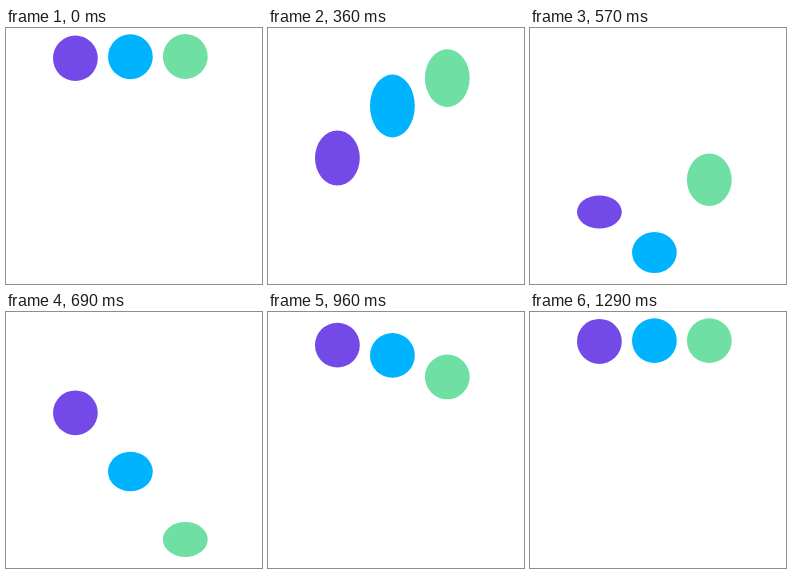
An HTML page with a canvas for the animation above (1320 ms loop, 256 px wide and 256 px high).

```html
<!DOCTYPE html>
<html>
<head>
<meta charset="utf-8">
<title>Bouncing balls</title>
<style>
  html, body { margin: 0; width: 100%; height: 100%; overflow: hidden; background: #fff; }
  canvas { display: block; width: 256px; height: 256px; }
</style>
</head>
<body>
<canvas id="stage" width="256" height="256"></canvas>
<script>
const LOOP = 1320, STEP = 30, LAG = 90, RADIUS = 22.4;
const BALLS = [
  { x: 69.4, color: '#734ae8' },
  { x: 124.4, color: '#00b3ff' },
  { x: 179.3, color: '#70dfa3' }
];

// Keys are [ms, value]; both curves repeat after one loop.
const height = smooth([
  [0, 30.3], [60, 33.4], [150, 44], [240, 67], [270, 78], [360, 130],
  [390, 151.7], [450, 201.5], [480, 224.5], [510, 227.5], [540, 211],
  [570, 184], [660, 117], [750, 74.9], [840, 49.3], [900, 39],
  [990, 31.4], [1080, 29], [1140, 28.5], [1200, 28.6], [1290, 29.4]
]);
const stretch = smooth([
  [0, 22.8], [60, 24.9], [150, 27.9], [240, 30.5], [270, 31.4],
  [360, 27.5], [450, 23.4], [480, 20.5], [510, 17.5], [540, 15.7],
  [570, 16.5], [630, RADIUS], [1260, RADIUS]
]);

// Monotone cubic interpolation through periodic keys.
function smooth(keys) {
  const n = keys.length;
  const key = i => {
    const turn = Math.floor(i / n);
    const [t, v] = keys[i - turn * n];
    return [t + turn * LOOP, v];
  };
  const rate = i => {
    const [t0, v0] = key(i), [t1, v1] = key(i + 1);
    return (v1 - v0) / (t1 - t0);
  };
  const tangent = i => {
    const a = rate(i - 1), b = rate(i);
    return a * b > 0 ? 2 * a * b / (a + b) : 0;
  };
  return time => {
    const t = ((time % LOOP) + LOOP) % LOOP;
    let i = n - 1;
    while (keys[i][0] > t) i--;
    const [t0, v0] = key(i), [t1, v1] = key(i + 1);
    const span = t1 - t0, u = (t - t0) / span, w = 1 - u;
    return v0 * w * w * (1 + 2 * u) + v1 * u * u * (3 - 2 * u)
      + span * u * w * (tangent(i) * w - tangent(i + 1) * u);
  };
}

const ctx = document.getElementById('stage').getContext('2d');
const start = performance.now();

function draw() {
  const elapsed = performance.now() - start;
  const time = Math.floor((elapsed + 0.5) / STEP) * STEP % LOOP;
  ctx.fillStyle = '#fff';
  ctx.fillRect(0, 0, 256, 256);
  BALLS.forEach(({ x, color }, i) => {
    const t = time - i * LAG;
    ctx.fillStyle = color;
    ctx.beginPath();
    ctx.ellipse(x, height(t), RADIUS, stretch(t), 0, 0, Math.PI * 2);
    ctx.fill();
  });
  requestAnimationFrame(draw);
}
draw();
</script>
</body>
</html>
```
